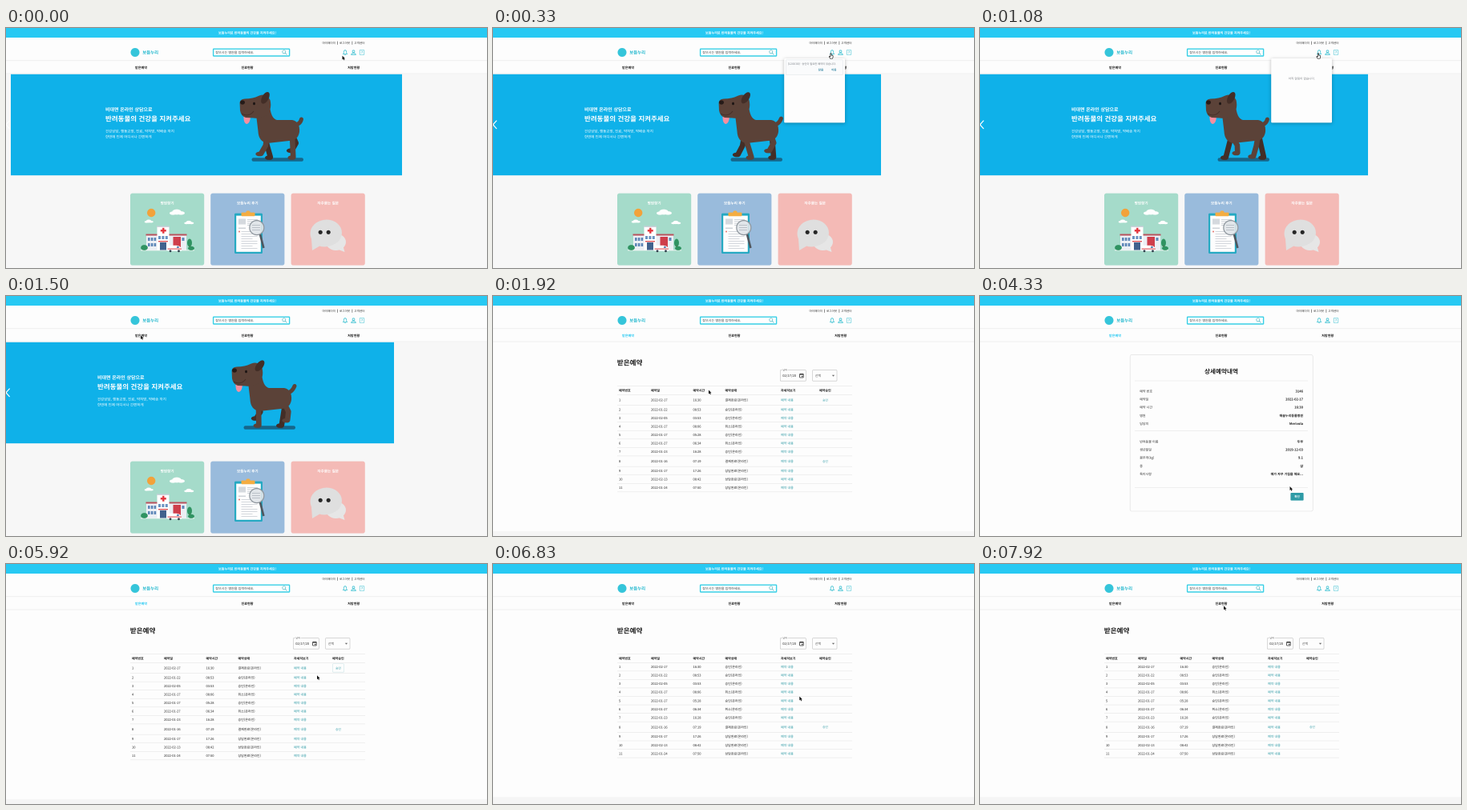
An HTML page with a canvas that plays this animation: 600x300 px, repeating every 8000 ms.

```html
<!DOCTYPE html>
<html lang="ko">
<head>
<meta charset="utf-8">
<title>보듬누리</title>
<style>
html, body { margin: 0; width: 100%; height: 100%; overflow: hidden; background: #fdfdfd; }
canvas { display: block; width: 600px; height: 300px; }
</style>
</head>
<body>
<canvas id="stage"></canvas>
<script>
const LOOP = 8000, STEP = 1000 / 12;
const CYAN = '#27c9f3', TEAL = '#2e9ba6', ICON = '#45c4d4', INK = '#1c1c1c', LINE = '#e6e6e6';
const FONT = '"Noto Sans CJK KR", "Noto Sans CJK", "Noto Sans", sans-serif';
const BRAND = '보듬누리';

// Twice the stage resolution keeps the tiny lettering well formed.
const canvas = document.getElementById('stage');
const ctx = canvas.getContext('2d');
const scale = 2 * (window.devicePixelRatio || 1);
canvas.width = 600 * scale;
canvas.height = 300 * scale;
ctx.textRendering = 'geometricPrecision';

// Text is centred vertically on y.
function text(s, x, y, size, color = INK, weight = 400, align = 'left') {
  ctx.font = `${weight} ${size}px ${FONT}`;
  ctx.fillStyle = color;
  ctx.textAlign = align;
  ctx.fillText(s, x, y + size * 0.37);
}
function rect(x, y, w, h, color) {
  ctx.fillStyle = color;
  ctx.fillRect(x, y, w, h);
}
function paint(path, fill, stroke, lw) {
  if (fill) { ctx.fillStyle = fill; ctx.fill(path); }
  if (stroke) { ctx.strokeStyle = stroke; ctx.lineWidth = lw; ctx.stroke(path); }
}
function box(x, y, w, h, r, fill, stroke, lw = 0.6) {
  const p = new Path2D();
  p.roundRect(x, y, w, h, r);
  paint(p, fill, stroke, lw);
}
function oval(x, y, rx, ry, fill, stroke, lw = 0.8, turn = 0) {
  const p = new Path2D();
  p.ellipse(x, y, rx, ry, turn, 0, Math.PI * 2);
  paint(p, fill, stroke, lw);
}
const shape = (d, fill, stroke, lw = 0.8) => paint(new Path2D(d), fill, stroke, lw);
const hr = (x0, x1, y) => rect(x0, y - 0.3, x1 - x0, 0.6, LINE);
const clamp = v => Math.min(1, Math.max(0, v));

function header(active) {
  rect(0, 0, 600, 57.8, '#fdfdfd');
  rect(0, 0, 600, 12, CYAN);
  text(`${BRAND}로 반려동물의 건강을 지켜주세요!`, 301, 6, 4.05, '#fff', 700, 'center');
  text('마이페이지', 394.5, 18.7, 3.6, '#333');
  text('로그아웃', 416, 18.7, 3.6, '#333');
  text('고객센터', 434.3, 18.7, 3.6, '#333');
  rect(413.2, 16.6, 0.6, 4.2, '#444');
  rect(431.6, 16.6, 0.6, 4.2, '#444');

  oval(161, 30.5, 5.5, 5.5, '#35c5da');
  text(BRAND, 170.3, 30.3, 5.4, '#22b9cf', 700);

  box(258.6, 26.2, 95, 8.8, 0.5, '#fff', '#38cfe6', 1.4);
  text('찾으시는 병원을 입력하세요.', 261.3, 30.6, 4.05, '#444');
  oval(346.8, 29.8, 2, 2, null, '#4fb5c0', 0.7);
  shape('M348.3 31.3L350.3 33.4', null, '#4fb5c0', 0.7);

  shape('M420.6 32.6Q421.4 31.8 421.4 30.2Q421.4 27.9 423 27.9Q424.7 27.9 424.7 30.2Q424.7 31.8 425.5 32.6Z', null, ICON);
  shape('M422.3 33.4Q423 34.2 423.8 33.4M423 27V28', null, ICON);
  oval(433.5, 29.2, 1.4, 1.4, null, ICON);
  shape('M430.8 33.6V33Q430.8 31.7 433.5 31.7Q436.2 31.7 436.2 33V33.6Z', null, ICON);
  box(441.2, 27.5, 5.6, 6, 0.6, null, ICON);
  text('?', 444, 30.5, 4.4, ICON, 700, 'center');

  hr(0, 600, 40.8);
  hr(0, 600, 57);
  text('받은예약', 168.5, 49.3, 4.1, active ? CYAN : INK, 700, 'center');
  text('진료현황', 301, 49.3, 4.1, INK, 700, 'center');
  text('처방현황', 433.7, 49.3, 4.1, INK, 700, 'center');
}

const BROWN = '#5b4238', DARK = '#432e27';

// One leg of the walk: the first half of the cycle is on the ground, the second swings forward.
function leg(x, y, phase, reach, color) {
  const a = phase * Math.PI * 2;
  const lift = Math.max(0, -Math.sin(a)) * 9;
  const fx = x - Math.cos(a) * reach, fy = 161.5 - lift;
  const kx = (x + fx) / 2 + lift * 0.5, ky = (y + fy) / 2;
  shape(`M${x} ${y}L${kx} ${ky}L${fx} ${fy}`, null, color, 6.6);
  oval(fx - 2, fy + 0.6, 4.8, 2.8, color);
}

function dog(t) {
  const phase = t / 640 + 0.414;
  const sway = Math.sin(phase * Math.PI * 2);
  box(296.5, 162.2, 64.5, 4.6, 2.3, '#16668a');
  ctx.lineCap = ctx.lineJoin = 'round';
  leg(313, 137, phase, 8, DARK);
  leg(348, 135, phase + 0.37, 6, DARK);
  leg(315, 137, phase + 0.5, 8, BROWN);
  leg(347, 134, phase + 0.87, 6, BROWN);
  shape(`M351 121Q357 120 ${359 - sway} ${113.5 + sway}`, null, BROWN, 5);
  ctx.lineCap = 'butt';
  ctx.lineJoin = 'miter';
  shape('M302 108L319 96Q320 113 328 115L347 115Q357 117 356 130Q354 141 343 141L316 144Q305 142 304.5 129Z', BROWN);
  shape('M286.5 109Q286 119.5 290.5 120Q295 118.5 295 109Z', '#f58fa0');
  shape('M281.6 94Q281.6 89 288 88.5Q298 88.5 306 84.5Q315 81 319.5 90Q322 101 316 108Q309 114 299 112.5L289 112Q283 110 282 103Z', BROWN);
  oval(285, 93, 3, 2.6, '#251a18');
  oval(299.5, 94.5, 1.4, 1.8, '#1b1413');
  shape('M284 107Q293 112 299 104', null, DARK, 0.8);
  oval(314.5 - sway * 2, 87.3, 4.2, 8, DARK, null, 0, 0.55 - sway * 0.1);
}

function slide(t) {
  ctx.save();
  ctx.translate(10 * Math.pow(1 - clamp(t / 260), 2), 0);
  rect(-4, 57.8, 488, 126.4, '#0fb1e9');
  text('비대면 온라인 상담으로', 114, 101.8, 6, '#fff', 700);
  text('반려동물의 건강을 지켜주세요', 114, 113.5, 8.5, '#fff', 700);
  text('건강상담, 행동교정, 진료, 약처방, 약배송 까지', 114, 129, 4.5, '#fff');
  text('한번에 언제 어디서나 간편하게', 114, 135.8, 4.5, '#fff');
  dog(t);
  ctx.restore();
  shape('M4.6 115.6L0 120.8L4.6 126', null, '#fff', 1.2);
}

function cloud(x, y, s) {
  oval(x, y, 6 * s, 3.6 * s, '#fff');
  oval(x - 5 * s, y + 1.6 * s, 4.5 * s, 2.2 * s, '#fff');
  oval(x + 5.5 * s, y + 1.4 * s, 5 * s, 2.3 * s, '#fff');
}

function hospital() {
  oval(181.2, 231, 5.2, 5.2, '#f2a23a');
  cloud(213, 230, 0.95);
  cloud(178, 241.5, 0.55);
  cloud(228, 243, 0.6);
  rect(168, 277.4, 67, 1, '#eef5f2');
  rect(175, 259, 50, 18.5, '#eceff4');
  rect(174.5, 257.5, 51, 2, '#b9525c');
  rect(188.5, 248.5, 15, 29, '#fff');
  rect(188, 247.5, 16, 1.4, '#c8ced8');
  rect(195.1, 249.8, 2.4, 7, '#e3353d');
  rect(192.8, 252.1, 7, 2.4, '#e3353d');
  for (let i = 0; i < 3; i++) {
    rect(177 + i * 3.8, 262, 2.6, 4, '#5f87b8');
    rect(177 + i * 3.8, 269, 2.6, 4, '#5f87b8');
    rect(190 + i * 4.4, 260, 3, 4, '#6c95c2');
  }
  rect(190, 266, 12, 1.4, '#d95356');
  rect(192, 268, 8, 9.5, '#41628d');
  rect(208.5, 261, 9.5, 13, '#cf3e4b');
  rect(219.5, 262, 3, 4, '#5f87b8');
  oval(172.5, 274.5, 4.4, 3.4, '#2f9361');
  oval(229, 268.5, 3, 5, '#2f9361');
  rect(228.6, 272, 0.9, 5.4, '#70513d');
  oval(231, 275.3, 4, 2.6, '#2f9361');
  box(201.5, 271.8, 12.5, 7, 1.2, '#fff');
  shape('M213 272.4H216L219 275.4V278.8H213Z', '#fff');
  rect(201.5, 275.6, 17.5, 1, '#df3f45');
  rect(213, 273, 2.8, 2, '#5f87b8');
  for (const x of [205, 215.5]) oval(x, 278.8, 1.4, 1.4, '#333d4c');
}

function clipboard() {
  box(285, 231.6, 35, 50.4, 1.6, '#25a9c2');
  rect(287.2, 234.6, 30.6, 45.2, '#fdfdfd');
  box(293.5, 230.6, 17, 4.6, 1, '#f4ad42');
  oval(302, 230.2, 2.6, 1.8, '#f4ad42');
  rect(290, 238.5, 9, 7, '#d5d9de');
  for (let i = 0; i < 4; i++) rect(301, 239 + i * 2.4, 13, 0.8, '#c3c9d0');
  rect(290, 249.6, 9, 1.2, '#c3c9d0');
  oval(291, 254.5, 1, 1, '#e6756e');
  for (let i = 0; i < 8; i++) rect(293.5, 254 + i * 3, i % 3 ? 20 : 14, 0.8, '#c9ced4');
  shape('M317 258L321.4 275', null, '#4f565e', 2.6);
  oval(312.8, 249.6, 9, 9, 'rgba(224,229,233,0.9)', '#8d959c', 1.2);
  for (let i = 0; i < 3; i++) rect(307, 246 + i * 3, 10, 0.9, '#b7bec5');
}

function bubbles() {
  oval(411.5, 267.5, 12.5, 10.5, '#e6e6e6');
  shape('M412 276L422.5 280L420 271Z', '#e6e6e6');
  oval(400, 256, 19, 16.5, '#dfdfdf');
  oval(397, 257, 17.5, 16.5, '#dfdfdf');
  shape('M381 264L382 278L394 271Z', '#dfdfdf');
  oval(392.2, 255.3, 2.6, 2.6, '#262626');
  oval(402.2, 255.3, 2.6, 2.6, '#262626');
}

function home(t) {
  rect(0, 57.8, 600, 243, '#f7f7f7');
  slide(t);
  const cards = [
    [155, '#a5dbca', '병원찾기', hospital],
    [255.2, '#99bbdc', `${BRAND} 후기`, clipboard],
    [355.6, '#f4bab6', '자주묻는 질문', bubbles]
  ];
  for (const [x, color, title, art] of cards) {
    box(x, 206.6, 92.2, 90, 2.6, color);
    text(title, x + 46.1, 218.8, 4.6, '#fff', 700, 'center');
    art();
  }
}

function popup(cleared) {
  ctx.save();
  ctx.shadowColor = 'rgba(0,0,0,0.28)';
  ctx.shadowBlur = 4 * scale;
  ctx.shadowOffsetY = scale;
  box(363.2, 38, 75.8, 80.4, 1, '#fdfdfd');
  ctx.restore();
  if (cleared) {
    text('아직 알림이 없습니다.', 401.3, 63, 3.65, '#85888c', 400, 'center');
    return;
  }
  box(365.4, 39.8, 71, 18.6, 0.8, '#fafbfc', '#e3e7ea');
  text('[12:00:00] · 승인이 필요한 예약이 있습니다.', 367.8, 45, 3.25, '#70767d');
  text('닫음', 409, 52.2, 3.5, '#3d8ba8', 700, 'center');
  text('이동', 425.3, 52.2, 3.5, '#3d8ba8', 700, 'center');
}

const COLS = [157, 197, 249.5, 289.5, 359, 407];
const HEADS = ['예약번호', '예약일', '예약시간', '예약상태', '자세히보기', '예약승인'];
const BOOKINGS = [
  '02-17 16:30 결제완료', '01-22 08:53 승인', '02-05 03:53 승인', '01-17 08:06 취소',
  '01-17 05:28 승인', '01-27 06:34 취소', '01-23 16:28 승인', '01-16 07:19 결제완료',
  '01-17 17:26 상담완료', '02-13 08:42 상담완료', '01-24 07:50 상담완료'
].map(s => s.split(' '));

function list(approved, pressed) {
  text('받은예약', 154.8, 83.2, 8.6, INK, 700);
  box(358.3, 92.6, 32, 13.6, 1, null, '#c2c2c2');
  rect(360.7, 91.5, 7, 2, '#fdfdfd');
  text('날짜', 361.4, 92.4, 3, '#666');
  text('02/17/20', 361.3, 99.6, 4.05, '#222');
  box(382.6, 97.4, 4.6, 4.6, 0.5, null, '#333', 0.8);
  rect(382.6, 97.2, 4.6, 1.3, '#333');
  rect(384.9, 99.8, 1.4, 1.3, '#333');
  box(398.6, 92.6, 30.4, 13.6, 1, null, '#c2c2c2');
  text('선택', 401.8, 99.5, 4, '#555');
  shape('M422.8 98.8H426.2L424.5 100.6Z', '#666');

  hr(155, 448, 112.3);
  HEADS.forEach((h, i) => text(h, COLS[i], 118.2, 4, INK, 700));
  let y = 123.3;
  hr(155, 448, y);
  BOOKINGS.forEach(([date, time, state], i) => {
    if (i === 0 && approved) state = '승인';
    const pending = state === '결제완료';
    const h = pending ? 13.3 : 10.55, mid = y + h / 2;
    [i + 1, '2022-' + date, time, state + '(온라인)'].forEach((s, c) => text(s, COLS[c], mid, 4, '#222'));
    text('예약 내용', COLS[4], mid, 4, TEAL);
    if (pending) {
      if (i === 0 && pressed) box(407.4, mid - 5.2, 14.2, 10.4, 1, null, '#cfe6e9');
      text('승인', 414.5, mid, 3.7, TEAL, 500, 'center');
    }
    y += h;
    hr(155, 448, y);
  });
  rect(0, y + 49.3, 600, 60, '#f5f5f5');
}

const VISIT = [['예약 번호', '3146'], ['예약일', '2022-02-17'], ['예약 시간', '16:30'],
  ['병원', '해솔누리동물병원'], ['담당의', 'Merivola']];
const PET = [['반려동물 이름', '두부'], ['생년월일', '2019-12-03'], ['몸무게(kg)', '9.1'],
  ['종', '샴'], ['특이사항', '애가 자꾸 기침을 해요...']];

function fields(rows, top) {
  rows.forEach(([label, value], i) => {
    text(label, 199.2, top + i * 10.1, 4, '#333');
    text(value, 403, top + i * 10.1, 4, INK, 700, 'right');
  });
}

function detail() {
  box(187.2, 73.6, 228, 195.4, 2, '#fdfdfd', '#dedede');
  text('상세예약내역', 301, 94, 7.6, INK, 700, 'center');
  hr(193, 409, 106);
  fields(VISIT, 119);
  hr(193, 409, 168.4);
  fields(PET, 182);
  hr(193, 409, 239.6);
  box(387.4, 246, 16.2, 9.6, 1, TEAL);
  text('확인', 395.5, 250.8, 3.6, '#fff', 700, 'center');
}

// Pointer stops: time, x, y
const STOPS = [
  [0, 419.5, 34.6], [250, 421.5, 32], [420, 421.5, 32], [600, 409, 51], [700, 409, 51],
  [920, 422, 32], [1100, 422, 32], [1480, 168, 49], [1680, 168, 49], [1920, 269, 117.5],
  [2350, 360, 178], [2650, 367, 129], [2950, 367, 129], [4330, 386.5, 238], [4500, 396, 250],
  [4900, 396, 250], [5450, 414, 129], [5680, 414, 129], [5920, 388, 139.3], [7330, 380, 176],
  [7800, 304, 52.3], [8000, 304, 52.3]
];

function pointer(t) {
  let i = 0;
  while (i < STOPS.length - 2 && t >= STOPS[i + 1][0]) i++;
  const [t0, x0, y0] = STOPS[i], [t1, x1, y1] = STOPS[i + 1];
  const k = clamp((t - t0) / (t1 - t0)), e = k * k * (3 - 2 * k);
  ctx.save();
  ctx.translate(x0 + (x1 - x0) * e, y0 + (y1 - y0) * e);
  ctx.lineJoin = 'round';
  if (t > 160 && t < 1150) {
    shape('M-0.6 0Q0 -0.8 0.6 0V2L2.6 2.6V4.6L2 6.2H-0.8L-2.2 3.8L-1.6 3.2L-0.6 3.8Z', '#fff', '#222', 0.7);
  } else {
    const arrow = 'M0 0V5L1.2 4L2 5.8L2.9 5.4L2.1 3.7H3.6Z';
    shape(arrow, null, '#fff', 1.2);
    shape(arrow, '#111');
  }
  ctx.restore();
}

function draw(t) {
  ctx.setTransform(scale, 0, 0, scale, 0, 0);
  rect(0, 0, 600, 300, '#fdfdfd');
  const atHome = t < 1570, approved = t >= 6150;
  header(!atHome && !approved);
  if (atHome) {
    home(t);
    if (t > 160 && t < 1240) popup(t >= 700);
  } else if (t >= 2900 && t < 4740) {
    detail();
  } else {
    list(approved, t >= 5400 && !approved);
  }
  pointer(t);
}

const start = performance.now();
function tick() {
  const t = (performance.now() - start) % LOOP;
  draw(Math.floor((t + 4) / STEP) * STEP % LOOP);
  requestAnimationFrame(tick);
}
tick();
</script>
</body>
</html>
```
